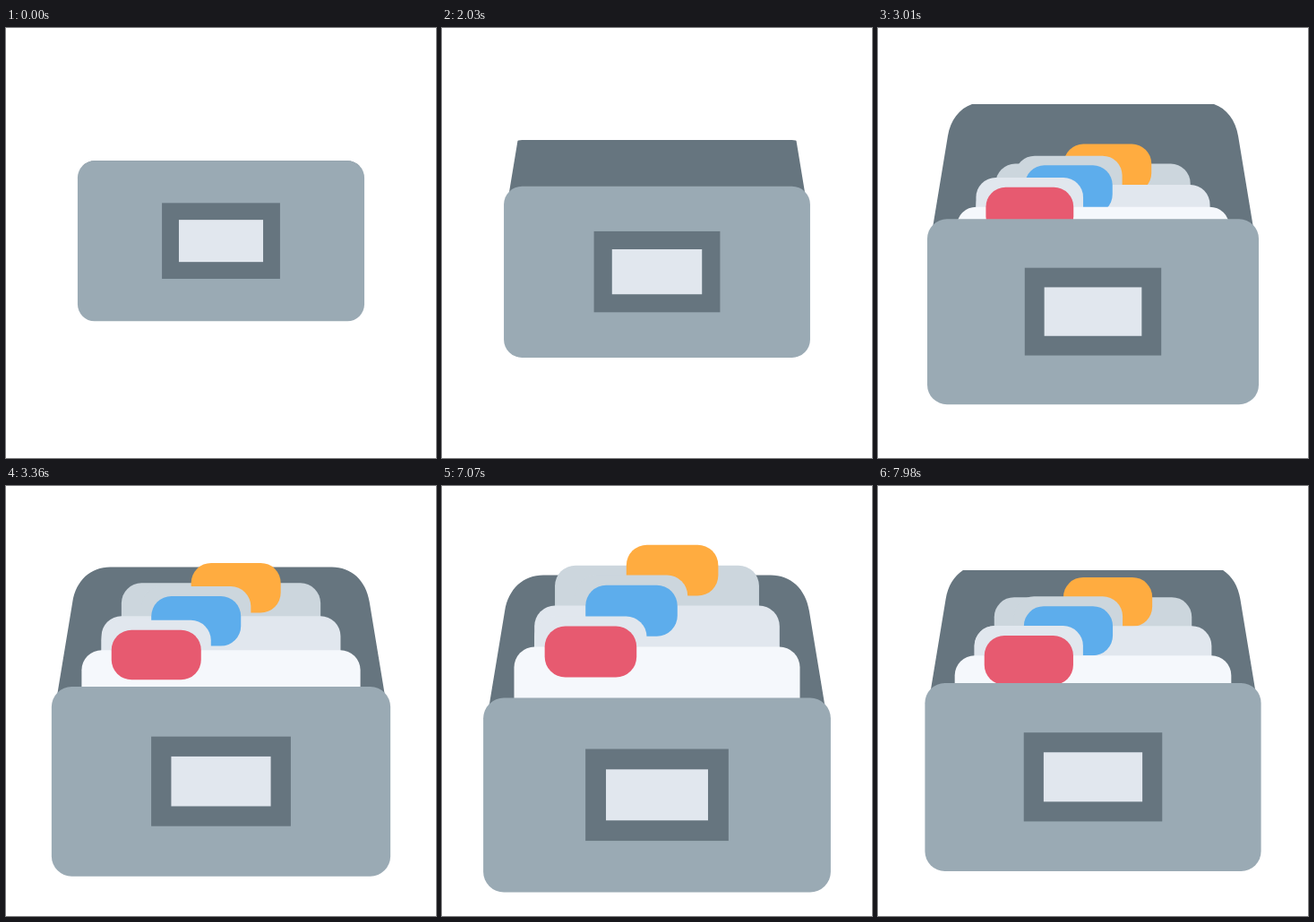
Animation of 480x480 px, one loop 8 s. Source, as an HTML page:

```html
<!DOCTYPE html>
<html lang="en">
<head>
<meta charset="utf-8">
<title>File drawer</title>
<style>
  html, body { margin: 0; width: 100%; height: 100%; overflow: hidden; background: #fff; }
  svg { display: block; width: 100vw; height: 100vh; }
  .dark { fill: #66757f; }
  .steel { fill: #9aaab4; }
  .grey { fill: #ccd6dd; }
  .pale { fill: #e1e7ee; }
  .white { fill: #f5f8fc; }
  .orange { fill: #ffac40; }
  .blue { fill: #5dadec; }
  .red { fill: #e75a70; }
</style>
</head>
<body>
<svg viewBox="0 0 480 480">
  <defs>
    <clipPath id="opening"><rect id="reveal" x="-194" width="388" rx="23"/></clipPath>
  </defs>
  <!-- Local origin: middle of the drawer front's top edge -->
  <g id="drawer">
    <g clip-path="url(#opening)">
      <path class="dark" d="M-189 18L-170-97C-166-122-149-137-127-137H127C149-137 166-122 170-97L189 18Z"/>
      <g class="file">
        <rect class="grey" x="-114" y="-148" width="228" height="160" rx="23"/>
        <rect class="orange" x="-34.2" y="-171" width="102.6" height="57" rx="23"/>
      </g>
      <g class="file">
        <rect class="grey" x="-91.2" y="-137" width="125.4" height="80" rx="23"/>
        <rect class="pale" x="-136.9" y="-103" width="273.8" height="130" rx="23"/>
        <rect class="blue" x="-79.8" y="-125.8" width="102.6" height="57" rx="23"/>
      </g>
      <g class="file">
        <rect class="pale" x="-136.9" y="-91.2" width="125.4" height="80" rx="23"/>
        <rect class="white" x="-159.6" y="-57" width="319.2" height="120" rx="23"/>
        <rect class="red" x="-125.4" y="-80" width="102.6" height="57" rx="23"/>
      </g>
    </g>
    <rect class="steel" x="-194" width="388" height="217" rx="23"/>
    <rect class="dark" x="-79.9" y="57" width="159.8" height="102.6"/>
    <rect class="pale" x="-57" y="79.8" width="114" height="57"/>
  </g>
</svg>
<script>
  const LOOP = 8000, STEP = 70;
  const OPEN = 650, CLOSE = 6950, SLIDE = 3600;
  const RISE = 2100, RISE_TIME = 1700;
  const HIDE_TIME = 2860, REVEAL = 183;

  const drawer = document.getElementById('drawer');
  const reveal = document.getElementById('reveal');
  const files = document.querySelectorAll('.file');

  const ease = (t, start, length) => {
    const x = Math.min(1, Math.max(0, (t - start) / length));
    return (1 - Math.cos(Math.PI * x)) / 2;
  };

  function draw(t) {
    // Closing runs the opening backwards
    const m = Math.min(t, CLOSE + OPEN + SLIDE - t);
    const slide = ease(m, OPEN, SLIDE);
    const rise = ease(m, RISE, RISE_TIME);
    // The visible depth shrinks faster than the drawer closes
    const depth = REVEAL * (t < CLOSE ? slide : 1 - ease(t, CLOSE, HIDE_TIME));

    drawer.setAttribute('transform',
      `translate(240 ${148.3 + 88.5 * slide}) scale(${0.825 + 0.175 * slide})`);
    reveal.setAttribute('y', -depth);
    reveal.setAttribute('height', depth + 60);
    files.forEach((file, i) => {
      const drop = (187 - 45.5 * i) * (1 - rise);
      file.setAttribute('transform', `translate(0 ${drop})`);
    });
  }

  const begin = performance.now();
  function tick() {
    const t = (performance.now() - begin) % LOOP;
    draw(Math.floor(t / STEP) * STEP);
    requestAnimationFrame(tick);
  }
  tick();
</script>
</body>
</html>
```
